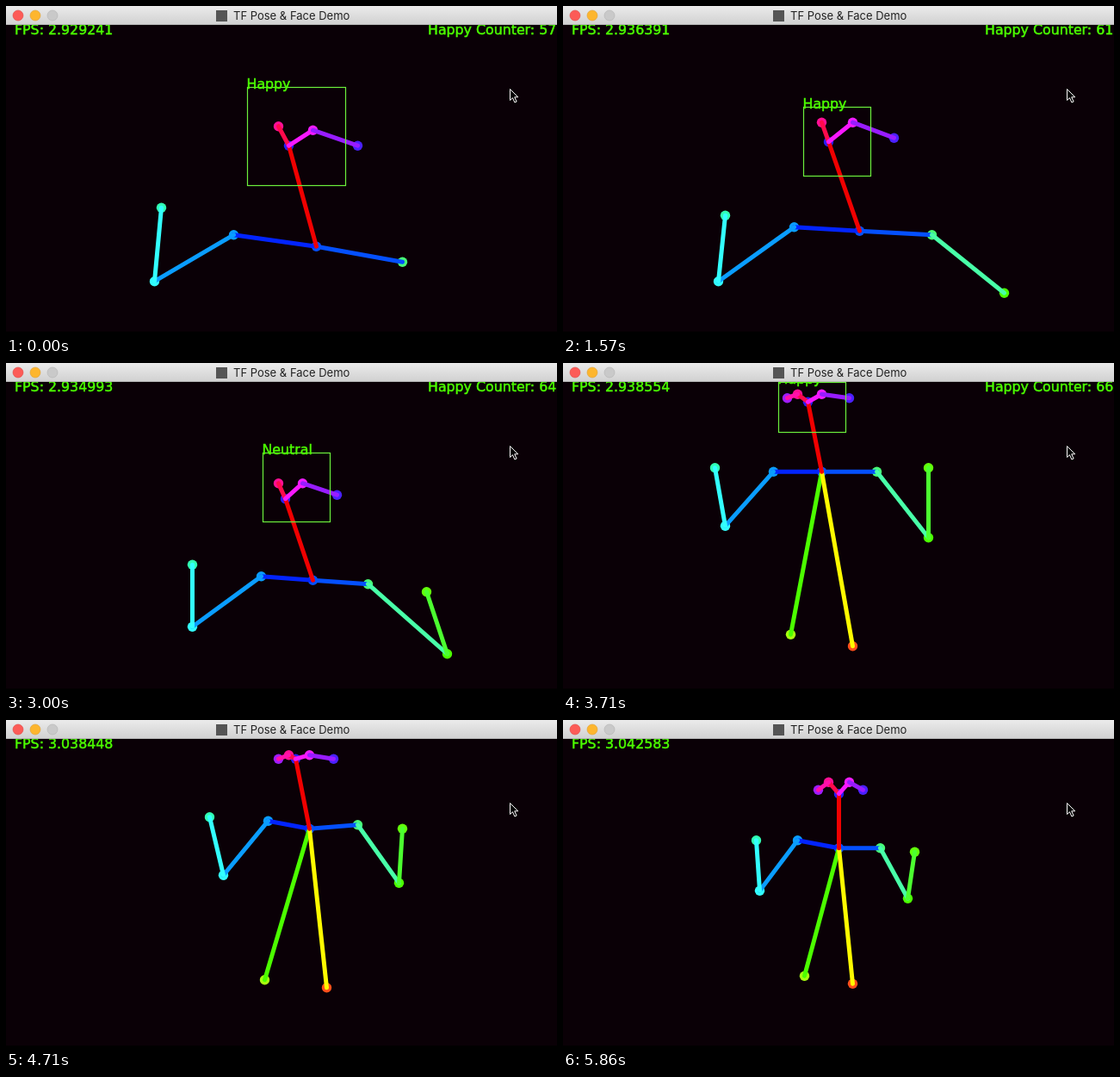
These frames come from a looping animation (640x382 px, 6010 ms). An HTML page:

```html
<!DOCTYPE html>
<html lang="en">
<head>
<meta charset="utf-8">
<title>Pose demo</title>
<style>
  html, body { margin: 0; width: 100%; height: 100%; overflow: hidden; background: #0a0006; }
  svg { display: block; width: 100vw; height: 100vh; }
  .cv { font: 15.8px "DejaVu Sans", sans-serif; fill: #4cff00; stroke: #4cff00; stroke-width: .5; }
  .title { font: 13px Inter, sans-serif; fill: #222; }
</style>
</head>
<body>
<svg viewBox="0 0 640 382">
  <defs>
    <linearGradient id="bar" x2="0" y2="1">
      <stop stop-color="#ebebeb"/>
      <stop offset="1" stop-color="#d0d0d0"/>
    </linearGradient>
  </defs>
  <rect width="640" height="382" fill="#0a0006"/>
  <rect y="378" width="640" height="4" fill="#000"/>
  <g id="dots"></g>
  <g id="limbs" stroke-width="5" stroke-linecap="round"></g>
  <g id="face">
    <rect id="box" fill="none" stroke="#6cf03c" stroke-width="1.2"/>
    <text id="mood" class="cv"></text>
    <text id="count" class="cv" x="490" y="33"></text>
  </g>
  <text id="fps" class="cv" x="10" y="33"></text>
  <rect width="640" height="22" fill="url(#bar)"/>
  <rect y="21" width="640" height="1" fill="#b4b4b4"/>
  <g stroke-width=".6">
    <circle cx="14" cy="11" r="6" fill="#fc5b57" stroke="#df4744"/>
    <circle cx="34" cy="11" r="6" fill="#fdb62e" stroke="#de9f34"/>
    <circle cx="54" cy="11" r="6" fill="#c9c9c9" stroke="#b4b4b4"/>
  </g>
  <rect x="244" y="5" width="13" height="13" fill="#555"/>
  <text class="title" x="264" y="16">TF Pose &amp; Face Demo</text>
  <path d="M585.5 96.5v13l3-2.8 2.4 5.3 2.2-1-2.4-5.2h4z" fill="#000" stroke="#fff"/>
</svg>
<script>
const LOOP = 6010, LAST = 41, STILL = [16, 30, 37], FACE_END = 28;
const $ = id => document.getElementById(id);

const joints = {
  nose: '#2a1cff', neck: '#0450ff',
  rSho: '#0a9dff', rElb: '#33ffff', rWri: '#30ffb4',
  lSho: '#48ff78', lElb: '#4cff00', lWri: '#62ff0a',
  rHip: '#a8ff10', lHip: '#ff4f1a',
  rEye: '#ff0f96', lEye: '#f01cff', rEar: '#a01cff', lEar: '#4a20ff'
};
const limbs = [
  ['neck', 'rSho', '#0224ff'], ['neck', 'lSho', '#0450ff'],
  ['rSho', 'rElb', '#0a9dff'], ['rElb', 'rWri', '#33ffff'],
  ['lSho', 'lElb', '#48ffa8'], ['lElb', 'lWri', '#4cff30'],
  ['neck', 'rHip', '#4cff00'], ['neck', 'lHip', '#fffb00'],
  ['neck', 'nose', '#f00000'],
  ['nose', 'rEye', '#ff0a4c'], ['rEye', 'rEar', '#ff10aa'],
  ['nose', 'lEye', '#f818ff'], ['lEye', 'lEar', '#981cff']
];

// Poses on the detector grid (4 by 4.5 px), keyed by step.
const poses = [];
const pose = (step, p) => poses.push([step, p]);
pose(0, { nose: [82, 36], neck: [90, 62], rSho: [66, 59], rElb: [43, 71], rWri: [45, 52],
  lSho: [115, 66], rEye: [79, 31], lEye: [89, 32], lEar: [102, 36] });
pose(6, { nose: [79, 36], neck: [88, 60], rSho: [66, 58], rElb: [43, 71], rWri: [45, 53],
  lSho: [113, 63], lElb: [132, 72], rEye: [76, 31], lEye: [86, 30], lEar: [99, 34] });
pose(15, { nose: [76, 34], neck: [85, 57], rSho: [67, 56], rElb: [47, 71], rWri: [49, 54],
  lSho: [102, 56], lElb: [125, 75], lWri: [120, 62], rEye: [74, 30], lEye: [82, 30], lEar: [93, 34] });
pose(21, { nose: [81, 35], neck: [89, 56], rSho: [74, 55], rElb: [54, 68], rWri: [54, 52],
  lSho: [105, 57], lElb: [128, 75], lWri: [122, 59], rEye: [79, 31], lEye: [86, 31], lEar: [96, 34] });
pose(26, { nose: [71, 10], neck: [75, 28], rSho: [61, 28], rElb: [47, 42], rWri: [44, 27],
  lSho: [91, 28], lElb: [106, 45], lWri: [106, 27], rHip: [66, 70], lHip: [84, 73],
  rEye: [68, 8], lEye: [75, 8], rEar: [65, 9], lEar: [83, 9] });
pose(33, { nose: [84, 10], neck: [88, 28], rSho: [76, 26], rElb: [63, 40], rWri: [59, 25],
  lSho: [102, 27], lElb: [114, 42], lWri: [115, 28], rHip: [75, 67], lHip: [93, 69],
  rEye: [82, 9], lEye: [88, 9], rEar: [79, 10], lEar: [95, 10] });
pose(41, { nose: [80, 19], neck: [80, 33], rSho: [68, 31], rElb: [57, 44], rWri: [56, 31],
  lSho: [92, 33], lElb: [100, 46], lWri: [102, 34], rHip: [70, 66], lHip: [84, 68],
  rEye: [77, 16], lEye: [83, 16], rEar: [74, 18], lEar: [87, 18] });

// Face centre, size, label
const faces = [
  [0, { x: 337, y: 151, w: 114, h: 114, mood: 'Happy' }],
  [6, { x: 325, y: 163, w: 114, h: 114, mood: 'Happy' }],
  [15, { x: 313, y: 152, w: 78, h: 80, mood: 'Happy' }],
  [21, { x: 337, y: 144, w: 78, h: 80, mood: 'Neutral' }],
  [26, { x: 289, y: 40, w: 78, h: 80, mood: 'Happy' }],
  [33, { x: 340, y: 43, w: 78, h: 80, mood: 'Happy' }]
];
const counts = [[0, 57], [6, 59], [15, 63], [21, 64], [26, 66], [33, 68]];
const rates = [[0, 2.929241], [6, 2.954128], [8, 3.004175], [15, 2.846012], [21, 2.934993],
  [26, 2.938554], [33, 3.038448], [41, 3.042583]];

const lerp = (a, b, u) => a + (b - a) * u;

// Neighbouring keys around a step and the share of the way between them
function span(keys, step) {
  let i = 0;
  while (i < keys.length - 1 && keys[i + 1][0] <= step) i++;
  const [t0, a] = keys[i], [t1, b] = keys[i + 1] || [t0 + 1, a];
  return [a, b, (step - t0) / (t1 - t0)];
}

function add(parent, tag, attrs) {
  const el = document.createElementNS('http://www.w3.org/2000/svg', tag);
  parent.append(el);
  return set(el, attrs);
}
function set(el, attrs) {
  for (const k in attrs) el.setAttribute(k, attrs[k]);
  return el;
}
const show = (el, on) => el.setAttribute('visibility', on ? 'visible' : 'hidden');

const dots = {};
for (const name in joints) dots[name] = add($('dots'), 'circle', { r: 5.7, fill: joints[name] });
const lines = limbs.map(([a, b, stroke]) => add($('limbs'), 'line', { stroke }));

function drawBody(step) {
  const [a, b, u] = span(poses, step), at = {};
  for (const name in dots) {
    show(dots[name], name in a);
    if (!(name in a)) continue;
    const p = a[name], q = b[name];
    const x = 4 * Math.round(lerp(p[0], q[0], u)) + .5;
    const y = 4.5 * Math.round(lerp(p[1], q[1], u)) + .2;
    at[name] = [x, y];
    set(dots[name], { cx: x, cy: y });
  }
  limbs.forEach(([from, to], i) => {
    const p = at[from], q = at[to];
    show(lines[i], p && q);
    if (p && q) set(lines[i], { x1: p[0], y1: p[1], x2: q[0], y2: q[1] });
  });
}

function drawFace(step) {
  show($('face'), step < FACE_END);
  const [a, b, u] = span(faces, step), { w, h, mood } = u < .5 ? a : b;
  const x = Math.round(lerp(a.x, b.x, u) - w / 2);
  const y = Math.round(lerp(a.y, b.y, u) - h / 2);
  const top = Math.max(22, y);
  set($('box'), { x: x + .5, y: top + .5, width: w, height: y + h - top });
  set($('mood'), { x: x - .5, y: top + 1.5 }).textContent = mood;
  $('count').textContent = 'Happy Counter: ' + Math.floor(lerp(...span(counts, step)) + 1e-6);
}

function stepAt(t) {
  let k = Math.min(LAST, Math.floor(t * .007) + 1);
  while (k > 0 && Math.round(k * 100 / 7) * 10 > t) k--;
  return STILL.includes(k) ? k - 1 : k;
}

let shown = -1;
function draw(t) {
  const step = stepAt(t % LOOP);
  if (step === shown) return;
  shown = step;
  drawBody(step);
  drawFace(step);
  $('fps').textContent = 'FPS: ' + lerp(...span(rates, step)).toFixed(6);
}

const start = performance.now();
function tick(now) {
  draw(Math.max(0, now - start));
  requestAnimationFrame(tick);
}
draw(0);
requestAnimationFrame(tick);
</script>
</body>
</html>
```
